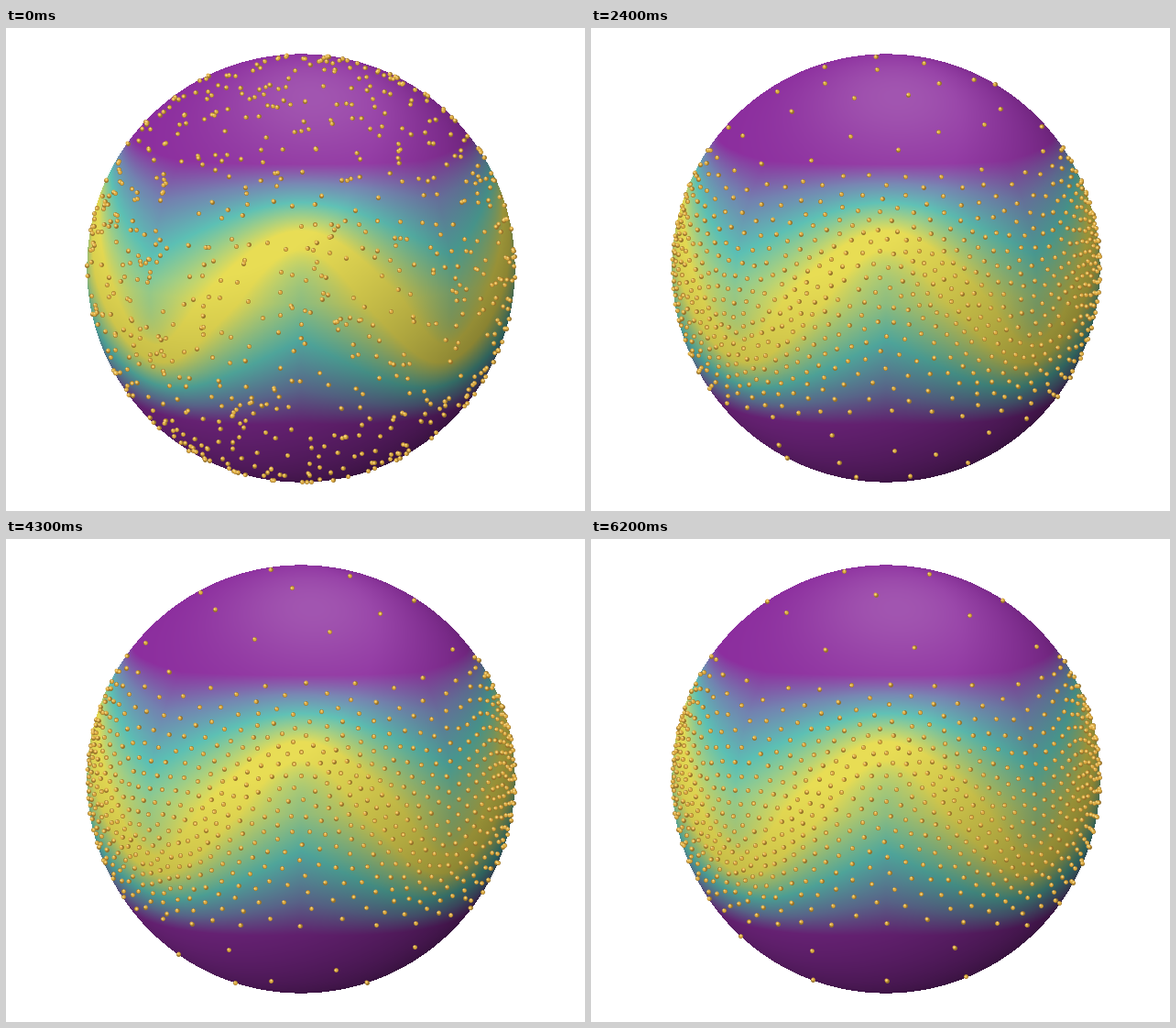
Write a matplotlib script that moves like this. It is 632x527 px and loops after 6300 ms.

```python
import numpy as np
import matplotlib.pyplot as plt
from matplotlib.animation import FuncAnimation

W, H, DPI = 632, 527, 100
CX, CY, R = 322, 262, 233.6
TILT, WAVE, BAND = 0.165, 0.30, 0.70
COUNT, STEPS = 1400, 48
FRAMES, INTERVAL = 63, 100
PAUSES = {*range(1, 8), *range(25, 29), 30, 42, 60}

rng = np.random.default_rng(5)


def unit(v):
    return v / np.linalg.norm(v, axis=-1, keepdims=True)


def random_sphere(n):
    return unit(rng.normal(size=(n, 3)))


def wave_curve(n=420):
    """Wave around the equator, seen by the tilted camera."""
    lon = np.linspace(0, 2 * np.pi, n, endpoint=False)
    lat = WAVE * np.cos(4 * lon)
    x, y, z = np.cos(lat) * np.sin(lon), np.sin(lat), np.cos(lat) * np.cos(lon)
    c, s = np.cos(TILT), np.sin(TILT)
    return np.stack([x, y * c - z * s, y * s + z * c])


CURVE = wave_curve().astype(np.float32)


def band_level(p):
    """0 on the wave, 1 at the borders of the band and beyond."""
    near = np.concatenate([(q.astype(np.float32) @ CURVE).max(1)
                           for q in np.array_split(p, len(p) // 20000 + 1)])
    dist = np.arccos(np.clip(near, -1, 1))
    axis = p[:, 1] * np.cos(TILT) + p[:, 2] * np.sin(TILT)
    gap = np.maximum(BAND - np.abs(np.arcsin(np.clip(axis, -1, 1))), 0)
    return dist / (dist + gap + 1e-6)


def density(p):
    return np.clip(1 - band_level(p) / 0.85, 0.02, 1)


def paint_sphere():
    px, py = np.meshgrid(np.arange(W) + 0.5, np.arange(H) + 0.5)
    x, y = (px - CX) / R, (CY - py) / R
    inside = x**2 + y**2 <= 1
    x, y = x[inside], y[inside]
    p = np.stack([x, y, np.sqrt(1 - x**2 - y**2)], 1)

    yellow, teal, slate, purple = (
        (232, 221, 84), (92, 192, 180), (114, 130, 176), (140, 46, 158))
    colors = np.array([yellow, teal, slate, purple])
    level = band_level(p)
    base = np.stack([np.interp(level, [0.1, 0.44, 0.68, 0.93], channel)
                     for channel in colors.T], 1)
    shade = np.minimum(0.7 + p @ [-0.17, 0.27, 0.27], 1)[:, None]
    shine = np.exp(10 * (p @ unit(np.array([0.05, 0.8, 0.6])) - 1))[:, None]
    lit = base * shade
    image = np.full((H, W, 3), 255.0)
    image[inside] = lit + 0.19 * shine * (255 - lit)
    return image.astype(np.uint8)


def transport(p, goal, rate, slices=96):
    """Move the points along random lines towards the goal's distribution."""
    dirs = random_sphere(slices)
    along, wanted = p @ dirs.T, np.sort(goal @ dirs.T, axis=0)
    order = np.argsort(along, axis=0)
    delta = np.empty_like(along)
    np.put_along_axis(
        delta, order, wanted - np.take_along_axis(along, order, 0), 0)
    return unit(p + 3 * rate * (delta @ dirs) / slices)


def spread(p, scale):
    """Push neighbours apart to the spacing that the density asks for."""
    q = p.astype(np.float32)
    own = (1.12 * scale / np.sqrt(density(p))).astype(np.float32)
    reach = np.minimum(own[:, None], own)
    d = np.sqrt(np.maximum(2 - 2 * q @ q.T, 1e-6))
    np.fill_diagonal(d, 9)
    force = 0.17 * reach * np.maximum(1 - d / reach, 0) / d
    move = force.sum(1, keepdims=True) * q - force @ q
    size = np.linalg.norm(move, axis=1, keepdims=True) + 1e-9
    return unit(p + move * np.minimum(1, 0.02 / size))


def simulate():
    pool = random_sphere(12000)
    weight = density(pool)
    goal = pool[rng.random(len(pool)) < weight][:COUNT]
    scale = np.sqrt(1.155 * 4 * np.pi * weight.mean() / COUNT)
    p = random_sphere(COUNT)
    states = [p]
    for step in range(1, STEPS + 1):
        p = transport(p, goal, 0.45 if step <= 10 else 0.08)
        if step > 2:
            for _ in range(2):
                p = spread(p, scale)
        states.append(p)
    return states


STATES = simulate()
STATE_AT = np.cumsum([i > 0 and i not in PAUSES for i in range(FRAMES)])

fig = plt.figure(figsize=(W / DPI, H / DPI), dpi=DPI, facecolor="white")
ax = fig.add_axes([0, 0, 1, 1])
ax.imshow(paint_sphere(), extent=(0, W, H, 0), interpolation="none",
          aspect="auto")
ax.set_xlim(0, W)
ax.set_ylim(H, 0)
ax.axis("off")

# Each dot: dark rim, gold body, small highlight
LAYERS = [(4.9, "#94702a", 0), (3.9, "#dcaa42", -0.3), (1.8, "#f8da88", -0.8)]
dots = [(ax.scatter([], [], s=(size * 72 / DPI)**2, c=color, linewidths=0,
                    zorder=3 + i), shift)
        for i, (size, color, shift) in enumerate(LAYERS)]


def update(i):
    p = STATES[STATE_AT[i]]
    p = p[p[:, 2] > 0]
    xy = np.stack([CX + R * p[:, 0], CY - R * p[:, 1]], 1)
    for layer, shift in dots:
        layer.set_offsets(xy + shift)
    return [layer for layer, _ in dots]


anim = FuncAnimation(fig, update, frames=FRAMES, interval=INTERVAL,
                     repeat=True, repeat_delay=0, blit=False)
plt.show()
```
